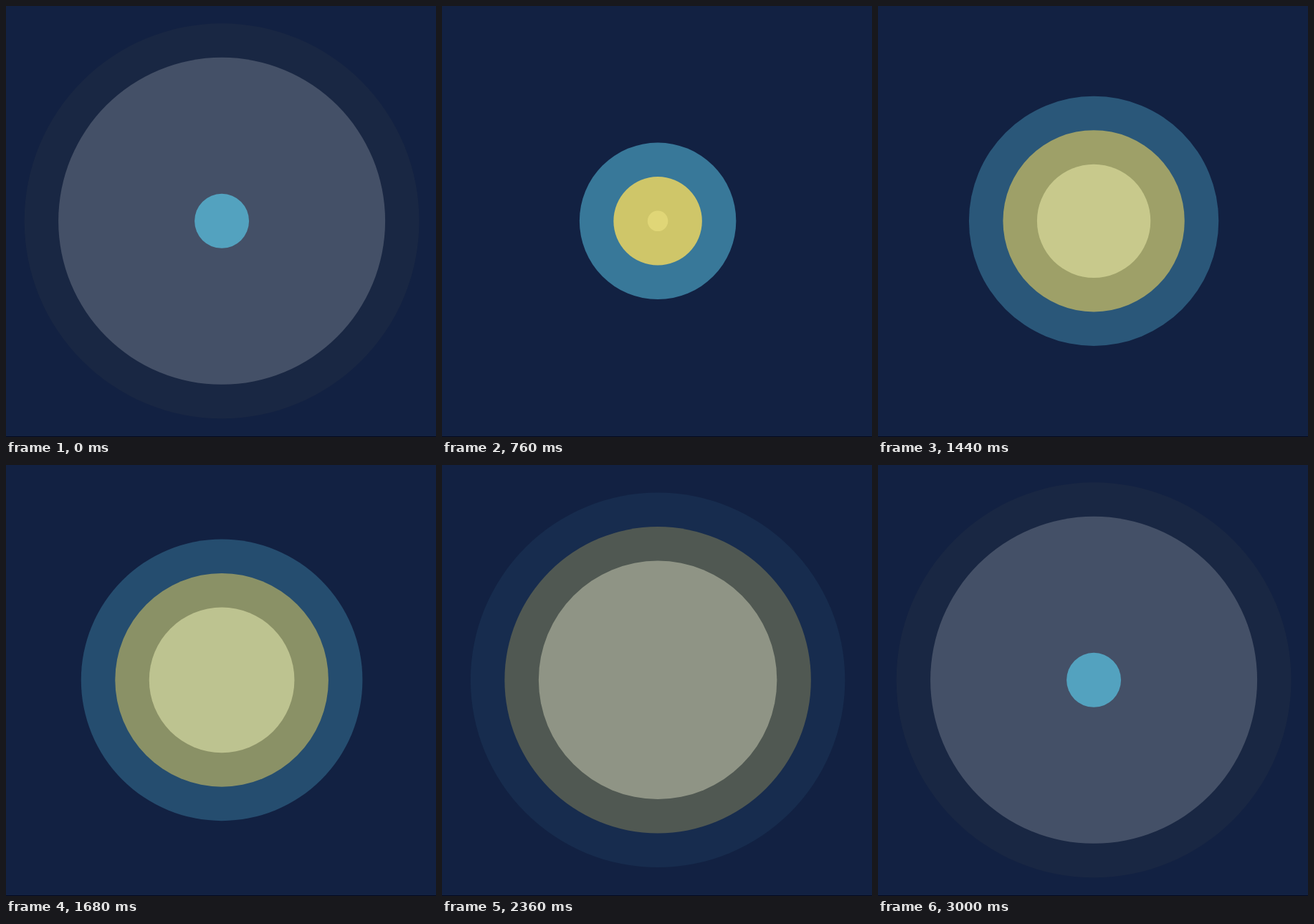
These frames come from a looping animation (600x601 px, 3040 ms). An HTML page with a canvas:

```html
<!DOCTYPE html>
<html lang="en">
<head>
<meta charset="utf-8">
<title>Ripples</title>
<style>
  html, body { margin: 0; width: 100%; height: 100%; overflow: hidden; background: #122142; }
  canvas { display: block; }
</style>
</head>
<body>
<canvas id="stage" width="600" height="601"></canvas>
<script>
const ctx = document.getElementById('stage').getContext('2d');
const LOOP = 3040, STEP = 40;
const LIFE = 3000, MAX_RADIUS = 285;
const CX = 301.1, CY = 299.8;

// Painted from back to front; start is the age in ms when the loop begins
const ripples = [
  { rgb: '237,244,248', start: 2400 },
  { rgb: '80,174,208', start: 400 },
  { rgb: '249,220,92', start: 2900 }
];

// Each 40 ms step shows the latest tick of a 60 Hz clock
function clockAt(time) {
  const step = Math.floor((time % LOOP) / STEP);
  return Math.floor(step * 12 / 5) * 1000 / 60;
}

function drawRipple({ rgb, start }, clock) {
  const p = ((clock + start) % LIFE) / LIFE;
  ctx.fillStyle = `rgba(${rgb},${(1 - p).toFixed(4)})`;
  ctx.beginPath();
  ctx.arc(CX, CY, MAX_RADIUS * p, 0, Math.PI * 2);
  ctx.fill();
}

function draw(time) {
  const clock = clockAt(time);
  ctx.fillStyle = '#122142';
  ctx.fillRect(0, 0, 600, 601);
  ripples.forEach(r => drawRipple(r, clock));
  ctx.fillStyle = '#040a1e';
  ctx.fillRect(0, 600, 600, 1);
}

const begin = performance.now();
function tick() {
  draw(performance.now() - begin);
  requestAnimationFrame(tick);
}
tick();
</script>
</body>
</html>
```
